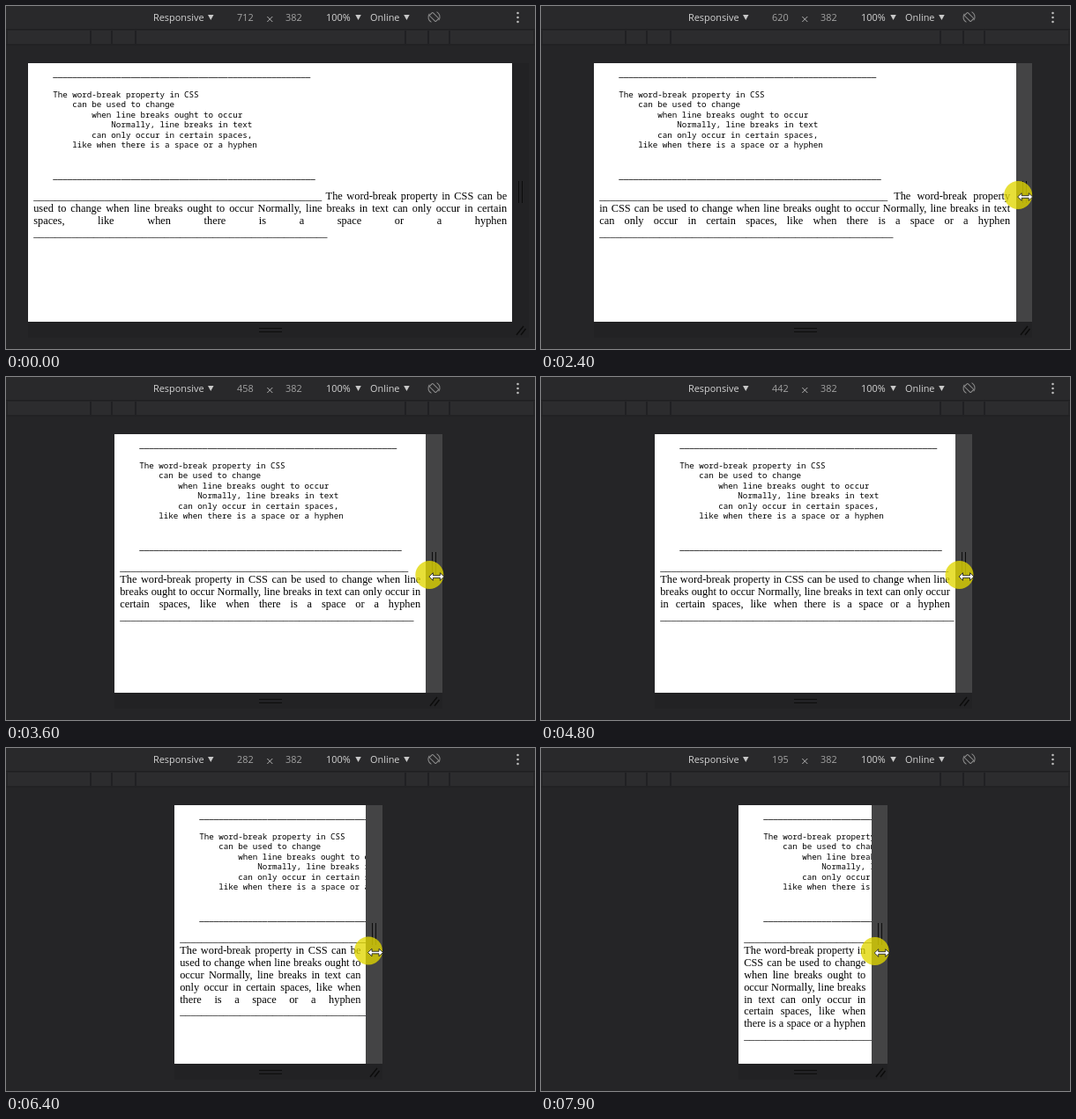
An HTML page for the animation above (8 s loop, 600 by 390 pixels).

```html
<!DOCTYPE html>
<html lang="en">
<head>
<meta charset="utf-8">
<title>Responsive word-break</title>
<style>
html, body { margin: 0; width: 100%; height: 100%; overflow: hidden; background: #252527; }
#stage { position: relative; width: 600px; height: 390px; overflow: hidden; background: #252527; }
#stage > * { position: absolute; }
.bar { left: 0; top: 0; width: 600px; height: 26px; background: #29292b;
  font: 10.9px/26px "Open Sans", "Noto Sans", sans-serif; color: #d4d4d4; }
.bar span { position: absolute; top: 0; white-space: pre; }
.bar .dim { color: #a3a3a3; }
svg { position: absolute; left: 0; top: 0; overflow: visible; }
#page { top: 65px; height: 293.5px; background: #fff; overflow: hidden; }
#doc { position: absolute; left: 0; top: 0; transform: scale(.7715); transform-origin: 0 0; color: #000; }
pre { position: absolute; left: 8px; top: 8px; margin: 0;
  font: 11.91px/15px "Noto Sans Mono", "DejaVu Sans Mono", monospace; }
p { position: absolute; left: 8px; right: 8px; top: 187px; margin: 0; text-align: justify;
  font: 16px/18px "Liberation Serif", "Times New Roman", serif; }
#side { top: 65px; width: 18.5px; height: 293.5px; background: #222224; }
#side.lit { background: #444445; }
#foot { top: 358.5px; height: 18.5px; background: #222224; }
#corner { top: 358.5px; width: 18.5px; height: 18.5px; background: #222224; }
.grip { position: absolute; box-sizing: border-box; border: solid #0c0c0c; }
#side .grip { left: 7px; top: 134px; width: 5px; height: 25px; border-width: 0 1.4px; }
#foot .grip { left: 50%; top: 7px; width: 26px; height: 5px; margin-left: -12.5px; border-width: 1.4px 0; }
#cursor { left: 0; top: 0; width: 1px; height: 1px; }
</style>
</head>
<body>
<div id="stage">
  <div class="bar">
    <span style="left:167px">Responsive</span>
    <span class="dim" id="size" style="left:262px">712</span>
    <span class="dim" style="left:317px">382</span>
    <span style="left:363px">100%</span>
    <span style="left:413px">Online</span>
  </div>
  <svg width="600" height="390" fill="none">
    <path fill="#c8c8c8" d="M229 10h6.500l-3.250 6zM396.300 10h6.500l-3.250 6zM451.200 10h6.500l-3.250 6z"/>
    <path stroke="#b0b0b0" d="M296.300 12l6 6m0-6l-6 6"/>
    <g transform="translate(485.500 12.500) rotate(-45)" stroke="#8f8f8f">
      <rect x="-2.600" y="-5" width="5.200" height="10" rx="1"/>
      <path d="M-6.300 2A6.500 6.500 0 0 1 -1 -6.400M6.300 -2A6.500 6.500 0 0 1 1 6.400"/>
    </g>
    <path stroke="#bdbdbd" stroke-width="2.600" stroke-linecap="round" d="M580.500 8v0M580.500 13v0M580.500 18v0"/>
    <path fill="#2c2c2e" d="M2 28H598V43H2z"/>
    <path stroke="#1f1f21" stroke-width="1.600" d="M96 28v15M120 28v15M147 28v15M453 28v15M479 28v15M503 28v15"/>
    <path stroke="#1f1f21" d="M0 26.500H600M0 44H600"/>
  </svg>
  <div id="page"><div id="doc"><pre></pre><p></p></div></div>
  <div id="side"><div class="grip"></div></div>
  <div id="foot"><div class="grip"></div></div>
  <div id="corner"><svg width="18" height="18" fill="none"><path stroke="#0c0c0c" stroke-width="1.400" d="M5 15L13 5M10 15L15.500 8"/></svg></div>
  <svg id="cursor">
    <circle cx="-8" cy="-2" r="16" fill="#e0d600" fill-opacity=".78"/>
    <path fill="#fff" stroke="#222" stroke-width=".9" stroke-linejoin="round"
      d="M-8.500 0l4.500-4.300v3h8v-3L8.500 0 4 4.300v-3h-8v3z"/>
  </svg>
</div>
<script>
const $ = s => document.querySelector(s);
const LOOP = 8000, SCALE = .7715, MID = 299.5;

const lines = [
  [4, 'The word-break property in CSS'],
  [8, 'can be used to change'],
  [12, 'when line breaks ought to occur'],
  [16, 'Normally, line breaks in text'],
  [12, 'can only occur in certain spaces,'],
  [8, 'like when there is a space or a hyphen']
];
const rule = n => '_'.repeat(n);
const indent = ([n, s]) => ' '.repeat(n) + s;
$('pre').textContent = [[4, rule(53)], [0, ''], ...lines, [0, ''], [0, ''], [4, rule(54)]].map(indent).join('\n');
$('p').textContent = [rule(53), ...lines.map(l => l[1]), rule(54)].join(' ');

// [time, value] pairs, linear in between
const widths = [[1800, 712], [2300, 650], [2400, 620], [3000, 497], [3200, 492], [3700, 450], [3900, 450],
  [4200, 442], [5100, 442], [5900, 335], [6000, 323], [6800, 240], [6900, 230], [7200, 195]];
const heights = [[500, 335], [1400, 217], [2400, 217], [3000, 227], [5100, 227], [5900, 232], [6800, 233]];
const offsets = [[500, 55], [1400, 11], [2400, 10.5], [3000, 12], [4800, 12.5], [5900, 11], [6800, 10.5], [7200, 12]];

function at(keys, t) {
  const i = keys.findIndex(k => k[0] > t);
  if (i === 0) return keys[0][1];
  if (i < 0) return keys[keys.length - 1][1];
  const [t0, a] = keys[i - 1], [t1, b] = keys[i];
  return a + (b - a) * (t - t0) / (t1 - t0);
}

function draw(t) {
  const w = Math.round(at(widths, t));
  const span = w * SCALE, left = MID - span / 2, right = MID + span / 2;
  $('#size').textContent = w;
  $('#doc').style.width = w + 'px';
  for (const id of ['#page', '#foot']) {
    $(id).style.left = left + 'px';
    $(id).style.width = span + 'px';
  }
  $('#side').style.left = $('#corner').style.left = right + 'px';
  const x = at(offsets, t);
  $('#side').classList.toggle('lit', x < 18.5);
  $('#cursor').style.transform = `translate(${right + x}px, ${at(heights, t)}px)`;
}

const start = performance.now();
function tick() {
  const t = (performance.now() - start) % LOOP;
  draw(Math.floor(t / 100) * 100);
  requestAnimationFrame(tick);
}
draw(0);
requestAnimationFrame(tick);
</script>
</body>
</html>
```
